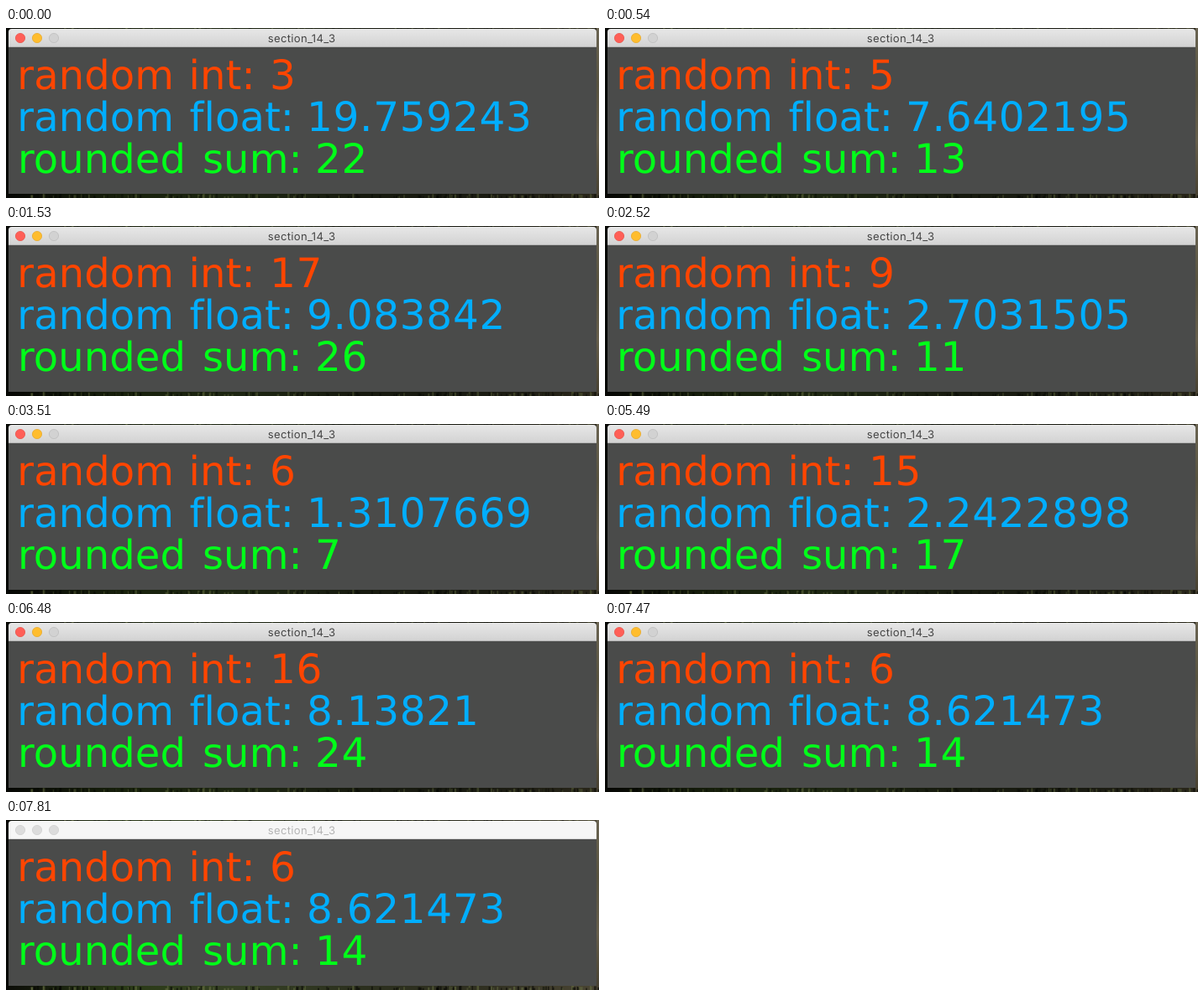
An HTML page with a canvas for the animation above (7.97 s loop, 706 by 203 pixels).

```html
<!DOCTYPE html>
<html lang="en">
<head>
<meta charset="utf-8">
<title>section_14_3</title>
<style>
html, body { margin: 0; width: 100%; height: 100%; overflow: hidden; background: #14150e; }
canvas { display: block; width: 706px; height: 203px; }
</style>
</head>
<body>
<canvas id="stage" width="706" height="203"></canvas>
<script>
const ctx = document.getElementById('stage').getContext('2d');
const W = 706, H = 203, LOOP = 7970, BLUR_AT = 7810;

// start time, random int, random float, rounded sum
const draws = [
  [0, '3', '19.759243', '22'],
  [540, '5', '7.6402195', '13'],
  [1530, '17', '9.083842', '26'],
  [2520, '9', '2.7031505', '11'],
  [3510, '6', '1.3107669', '7'],
  [4500, '4', '9.3615428', '13'],
  [5490, '15', '2.2422898', '17'],
  [6480, '16', '8.13821', '24'],
  [7470, '6', '8.621473', '14']
];

// colour, baseline, then label words and the number with their left edges
const lines = [
  { color: '#ff4500', y: 73, words: [['random', 13.3], ['int:', 217.5]], x: 314 },
  { color: '#00aeff', y: 123, words: [['random', 13.3], ['float:', 218.5]], x: 358 },
  { color: '#00ff19', y: 173, words: [['rounded', 14], ['sum:', 234]], x: 368 }
];

function rect(color, x, y, w, h) {
  ctx.fillStyle = color;
  ctx.fillRect(x, y, w, h);
}

function gradient(x, y, stops) {
  const g = ctx.createLinearGradient(0, 0, x, y);
  stops.forEach((c, i) => g.addColorStop(i / (stops.length - 1), c));
  return g;
}

function seeded(seed) {
  return () => (seed = (seed * 16807) % 2147483647) / 2147483647;
}

// soft woodland tones around the window
function backdrop(active) {
  rect(gradient(W, 0, active
    ? ['#060704', '#18210c', '#1d2612', '#171a0f', '#191a11', '#2a271b']
    : ['#0b0c07', '#2a3a16', '#354024', '#2b2f1d', '#2f2f20', '#4a4533']), 0, 0, W, H);
  rect(gradient(0, H, ['#6a6452', '#57523f', '#665e4b', '#453f2f']), 703, 0, 3, H);
  rect('#070805', 0, 0, 3, H);
  const rnd = seeded(41);
  ctx.globalAlpha = active ? 0.4 : 0.55;
  for (let i = 0; i < 240; i++) {
    const tone = rnd() < 0.55 ? '#040502' : '#667043';
    rect(tone, 20 + rnd() * 686, i % 3 ? 198 + rnd() * 3 : 0, 1 + rnd() * 2, i % 3 ? 5 : 1);
  }
  ctx.globalAlpha = 1;
}

function light(x, fill, edge) {
  ctx.beginPath();
  ctx.arc(x, 12, 5.6, 0, Math.PI * 2);
  ctx.fillStyle = fill;
  ctx.fill();
  ctx.strokeStyle = edge;
  ctx.lineWidth = 0.8;
  ctx.stroke();
}

function windowFrame(active) {
  ctx.beginPath();
  ctx.roundRect(3, 1, 700, 197, [4, 4, 0, 0]);
  ctx.fillStyle = '#4a4b4a';
  ctx.fill();
  ctx.beginPath();
  ctx.roundRect(3, 1, 700, 22, [4, 4, 0, 0]);
  ctx.fillStyle = active ? gradient(0, 23, ['#e8e8e8', '#d2d2d2']) : '#f6f6f6';
  ctx.fill();
  rect(active ? '#b4b4b4' : '#d5d5d5', 3, 22, 700, 1);

  const grey = active ? ['#d2d2d2', '#bebebe'] : ['#dcdcdc', '#d0d0d0'];
  light(17, ...(active ? ['#ff5f57', '#e9524a'] : grey));
  light(37, ...(active ? ['#ffbd2e', '#e8aa2c'] : grey));
  light(57, ...grey);

  ctx.font = '13px Inter, sans-serif';
  ctx.letterSpacing = '0.35px';
  ctx.textAlign = 'center';
  ctx.fillStyle = active ? '#444444' : '#b4b4b4';
  ctx.fillText('section_14_3', 352, 17);
}

function readout(values) {
  ctx.textAlign = 'left';
  lines.forEach(({ color, y, words, x }, i) => {
    ctx.fillStyle = color;
    // any spacing also keeps "fl" from joining
    ctx.font = '48px "DejaVu Sans", sans-serif';
    ctx.letterSpacing = '0.1px';
    words.forEach(([word, left]) => ctx.fillText(word, left, y));
    ctx.font = '48.5px "DejaVu Sans", sans-serif';
    ctx.letterSpacing = '0.7px';
    ctx.fillText(values[i], x, y);
  });
}

function render(t) {
  const active = t < BLUR_AT;
  const [, ...values] = draws.findLast(d => d[0] <= t);
  ctx.textRendering = 'geometricPrecision';
  backdrop(active);
  windowFrame(active);
  readout(values);
}

const start = performance.now();
function tick() {
  render((performance.now() - start) % LOOP);
  requestAnimationFrame(tick);
}
tick();
</script>
</body>
</html>
```
